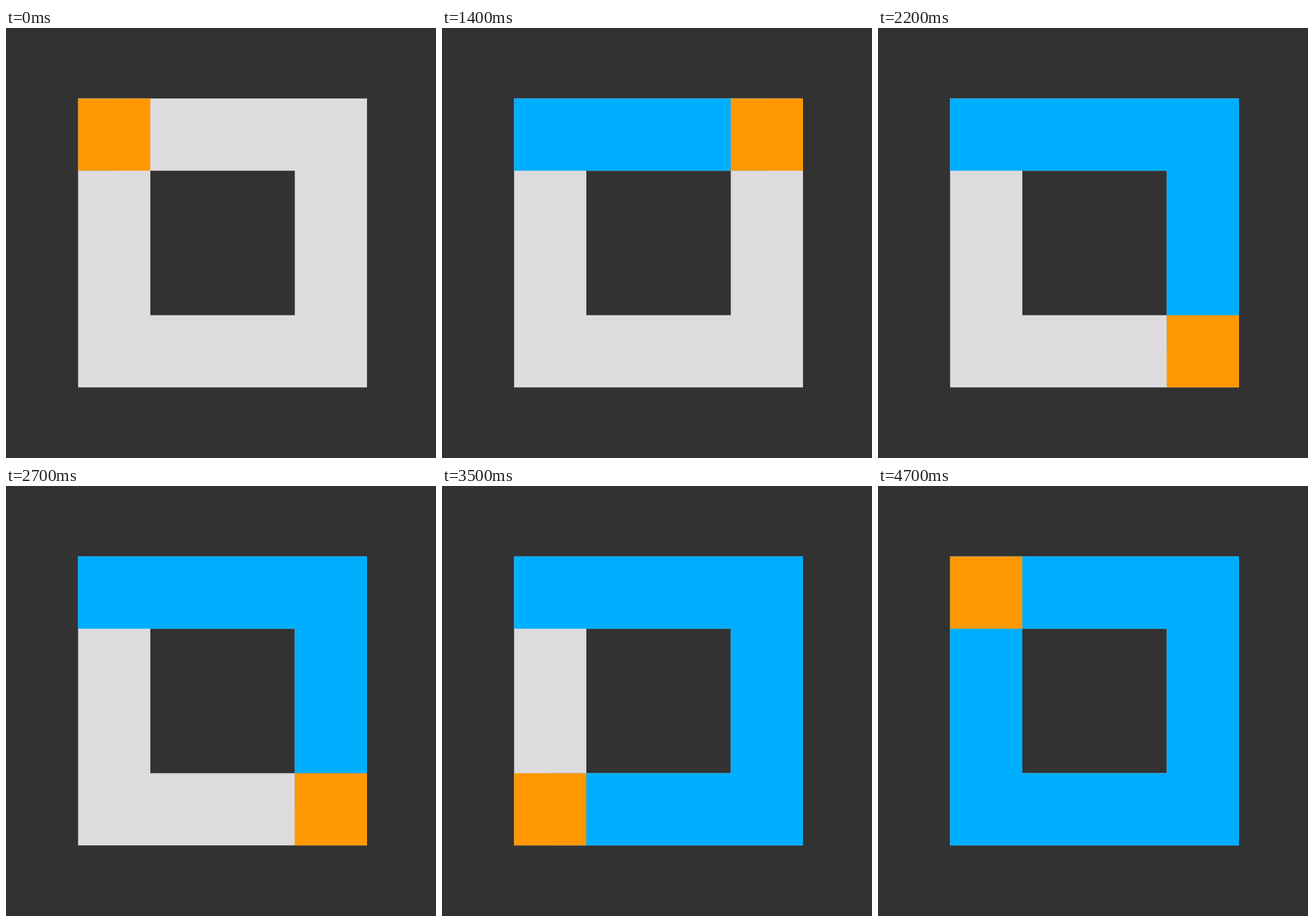
Recreate the animation shown at these times as an HTML page. Size 748 px wide and 748 px high, loop 4800 ms.

```html
<!DOCTYPE html>
<html lang="en">
<head>
<meta charset="utf-8">
<title>Square loop</title>
<style>
  /* Sides of the ring travelled so far, 0 to 4 */
  @property --p {
    syntax: "<number>";
    inherits: true;
    initial-value: 0;
  }

  html, body {
    margin: 0;
    width: 100%;
    height: 100%;
    overflow: hidden;
    background: #323232;
  }

  svg {
    --side: 376.95px;
    display: block;
    width: 100%;
    height: 100%;
    animation: travel 4800ms step-end infinite;
  }

  .ring, .trail {
    fill: none;
    stroke-width: 125.65px;
    stroke-linejoin: miter;
  }

  .ring { stroke: #dddbde; }

  .trail {
    stroke: #00aeff;
    stroke-dasharray: calc(62.825px + var(--p) * var(--side)) 4000px;
  }

  .head {
    fill: #ff9800;
    transform: translate(
      calc((clamp(0, var(--p), 1) - clamp(0, var(--p) - 2, 1)) * var(--side)),
      calc((clamp(0, var(--p) - 1, 1) - clamp(0, var(--p) - 3, 1)) * var(--side))
    );
  }

  /* Quick eased moves, held on a 100 ms beat */
  @keyframes travel {
    0%      { --p: 0; }
    18.75%  { --p: .57; }
    20.833% { --p: 1; }
    41.666% { --p: 1.37; }
    43.75%  { --p: 1.93; }
    45.833% { --p: 2; }
    62.5%   { --p: 2.4; }
    64.583% { --p: 2.94; }
    66.666% { --p: 3; }
    83.333% { --p: 3.4; }
    85.416% { --p: 3.94; }
    87.5%   { --p: 4; }
    100%    { --p: 4; }
  }
</style>
</head>
<body>
<svg viewBox="0 0 748 748">
  <rect class="ring" x="188.225" y="185.425" width="376.95" height="376.95"/>
  <path class="trail" d="M125.4 185.425h439.775v376.95h-376.95v-376.95"/>
  <rect class="head" x="125.4" y="122.6" width="125.65" height="125.65"/>
</svg>
</body>
</html>
```
